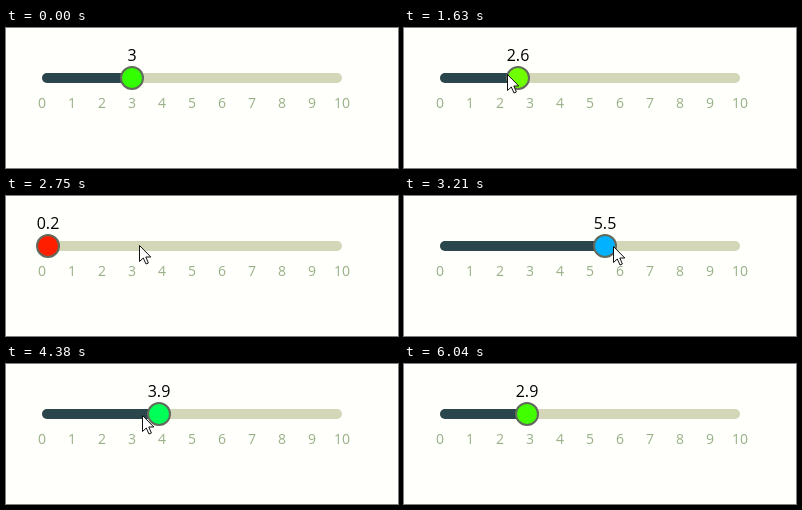
Write an HTML page that moves like this. It is 392 px wide and 140 px high and loops after 6.08 s.

```html
<!DOCTYPE html>
<html lang="en">
<head>
<meta charset="utf-8">
<title>Rainbow slider</title>
<style>
  html, body { margin: 0; width: 100%; height: 100%; overflow: hidden; background: #fffffb; }
  svg { display: block; width: 392px; height: 140px; }
  text { font-family: "Open Sans", "Noto Sans", sans-serif; text-anchor: middle; }
  #ticks { font-size: 14px; fill: #98b088; }
  #value { font-size: 16px; fill: #000; }
</style>
</head>
<body>
<svg viewBox="0 0 392 140">
  <rect x="36" y="45" width="300" height="10" rx="5" fill="#d4d6b8"/>
  <rect id="fill" x="36" y="45" height="10" rx="5" fill="#2b454c"/>
  <g id="ticks"></g>
  <circle id="thumb" cy="50" r="11" stroke="#626a5c" stroke-width="2"/>
  <text id="value" y="33"></text>
  <path id="cursor" d="M.5.5V16.5L4.3 13L7 19L9.4 18L6.8 12H11.8Z" fill="#fff" stroke="#111"/>
</svg>
<script>
const LOOP = 6080, LEFT = 36, UNIT = 30;
const LEAD = 35;   // ms by which the thumb trails the pointer
const GRIP = -5;   // pointer offset from the thumb centre
const $ = id => document.getElementById(id);
const fill = $("fill"), thumb = $("thumb"), value = $("value"), cursor = $("cursor");

const drags = [
  { start: 1460, end: 2130, from: 3, to: 0.2 },
  { start: 2880, end: 3690, from: 3.3, to: 9.5 },
  { start: 3690, end: 4790, from: 9.5, to: 1.4 },
  { start: 4950, end: 5500, from: 1.4, to: 2.9 }
];

const clamp = (n, low, high) => Math.min(high, Math.max(low, n));
const mix = (a, b, u) => a + (b - a) * u;
const xOf = v => LEFT + UNIT * v;

function ease(t, start, end) {
  const u = clamp((t - start) / (end - start), 0, 1);
  return (1 - Math.cos(Math.PI * u)) / 2;
}

function valueAt(t) {
  const drag = drags.findLast(d => t >= d.start) || drags[0];
  return mix(drag.from, drag.to, ease(t, drag.start, drag.end));
}

function pointerAt(t) {
  const enter = ease(t, 710, 1290), leave = ease(t, 5580, 6000);
  const away = t >= 2130 && t < 2880;
  const gripX = away
    ? mix(xOf(0.2) + GRIP, 133, ease(t, 2130, 2640))
    : xOf(valueAt(t + LEAD)) + GRIP;
  const gripY = clamp(46 + (t - 1630) / 370, 46, 51);
  return [
    mix(mix(150, gripX, enter), 144, leave),
    mix(mix(141, gripY, enter), 141, leave)
  ].map(Math.round);
}

for (let i = 0; i <= 10; i++) {
  const label = document.createElementNS("http://www.w3.org/2000/svg", "text");
  label.setAttribute("x", xOf(i));
  label.setAttribute("y", 80);
  label.textContent = i;
  $("ticks").append(label);
}

function draw(t) {
  const v = Math.round(valueAt(t) * 10) / 10;
  const x = xOf(v);
  fill.setAttribute("width", x - LEFT);
  thumb.setAttribute("cx", x);
  thumb.setAttribute("fill", `hsl(${v * 36}, 100%, 50%)`);
  value.setAttribute("x", x);
  value.textContent = v;
  cursor.setAttribute("transform", `translate(${pointerAt(t)})`);
}

const start = performance.now();
function frame() {
  draw((performance.now() - start) % LOOP);
  requestAnimationFrame(frame);
}
frame();
</script>
</body>
</html>
```
